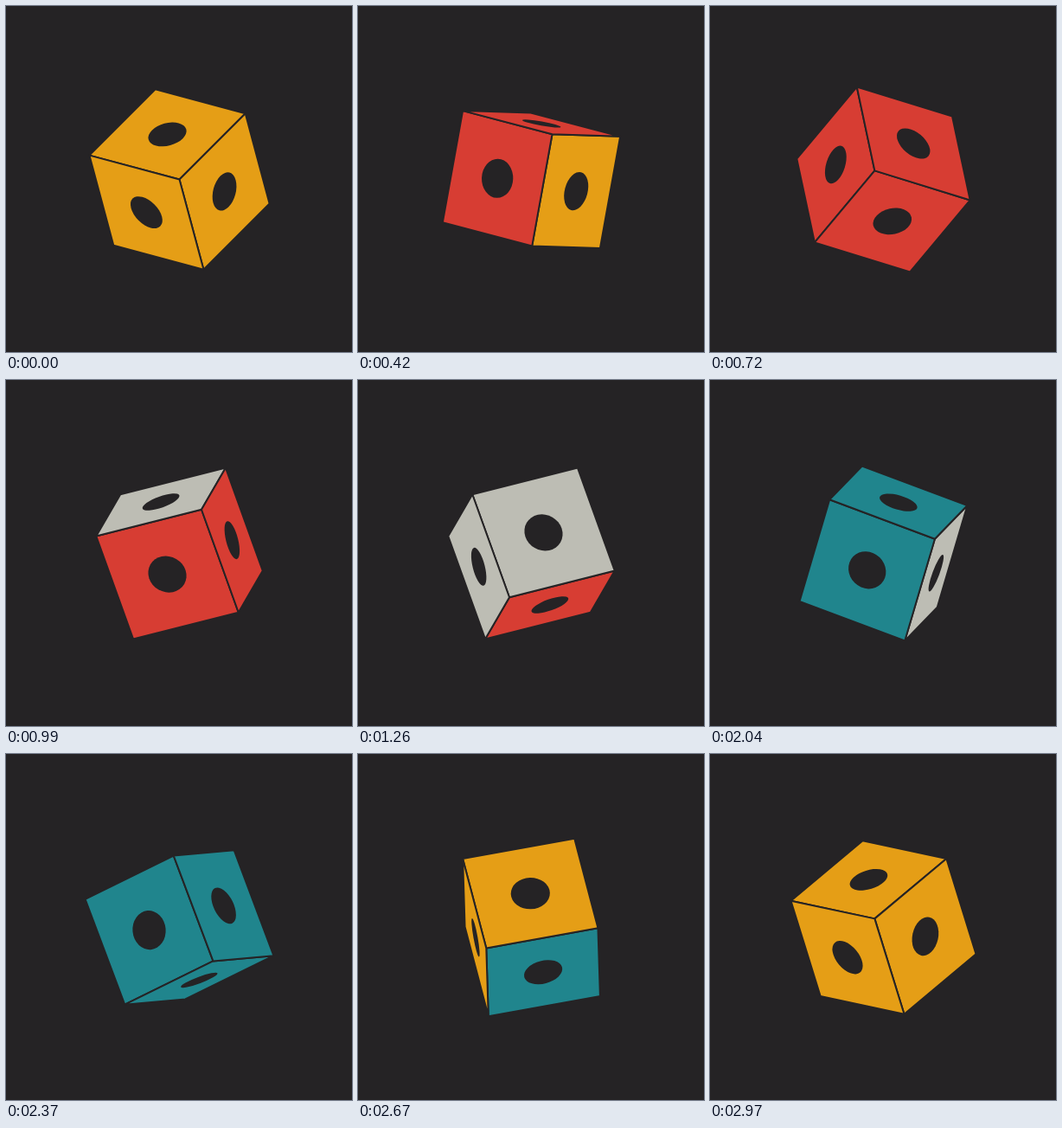
Animation, 400 px wide and 400 px high, one loop 3 s. Source, as an HTML page with a canvas:

```html
<!DOCTYPE html>
<html lang="en">
<head>
<meta charset="utf-8">
<title>Tumbling cube</title>
<style>
  html, body { margin: 0; width: 100%; height: 100%; overflow: hidden; background: #252325; }
  canvas { display: block; width: 400px; height: 400px; }
</style>
</head>
<body>
<canvas id="stage" width="400" height="400"></canvas>
<script>
const ctx = document.getElementById('stage').getContext('2d');
const LOOP = 3000, STEP = 30;
const BG = '#252325';
const CENTER = 200.5, SIDE = 132, HOLE = 22.6;
const COLORS = { front: ['#e59e16', '#bdbdb4'], back: ['#d73d33', '#20858d'] };

// Three cube axes, standing on a corner. u runs along the spin axis,
// phi is the angle around it and r the distance from it.
const tilt = Math.atan2(Math.sqrt(3 / 2), 1);
const far = Math.sqrt(5 / 6), near = Math.sqrt(1 / 3);
const AXES = [
  { u: Math.sqrt(1 / 6), r: far, phi: -tilt },
  { u: Math.sqrt(1 / 6), r: far, phi: tilt },
  { u: -Math.sqrt(2 / 3), r: near, phi: 0 }
];

// The spin axis lies in the screen, pointing up and to the right.
function project({ u, r, phi }, spin) {
  const v = r * Math.sin(phi + spin);
  return { x: (u + v) * Math.SQRT1_2, y: (v - u) * Math.SQRT1_2, z: r * Math.cos(phi + spin) };
}

// Each face takes its next colour while it is turned away.
function faceColor(turn, pair) {
  const k = Math.round(turn / (2 * Math.PI));
  return pair[Math.abs(k) % 2];
}

function drawFace(n, p, q, color) {
  const h = SIDE / 2;
  ctx.beginPath();
  for (const [i, j] of [[1, 1], [1, -1], [-1, -1], [-1, 1]]) {
    ctx.lineTo(h * (n.x + i * p.x + j * q.x), h * (n.y + i * p.y + j * q.y));
  }
  ctx.closePath();
  ctx.fillStyle = color;
  ctx.fill();
  ctx.stroke();

  ctx.beginPath();
  ctx.ellipse(h * n.x, h * n.y, HOLE * n.z, HOLE, Math.atan2(n.y, n.x), 0, 2 * Math.PI);
  ctx.fillStyle = BG;
  ctx.fill();
}

function draw(time) {
  const t = Math.floor((time % LOOP) / STEP) * STEP;
  const spin = t / LOOP * 4 * Math.PI;
  const dirs = AXES.map(a => project(a, spin));

  ctx.setTransform(1, 0, 0, 1, 0, 0);
  ctx.fillStyle = BG;
  ctx.fillRect(0, 0, 400, 400);
  ctx.translate(CENTER, CENTER);
  ctx.strokeStyle = BG;
  ctx.lineWidth = 2;
  ctx.lineJoin = 'round';

  dirs.forEach((d, i) => {
    const s = d.z > 0 ? 1 : -1;
    const n = { x: s * d.x, y: s * d.y, z: s * d.z };
    if (n.z < 1e-4) return;
    const turn = AXES[i].phi + spin;
    const color = s > 0 ? faceColor(turn, COLORS.front) : faceColor(turn - Math.PI, COLORS.back);
    drawFace(n, dirs[(i + 1) % 3], dirs[(i + 2) % 3], color);
  });
}

function tick() {
  draw(performance.now());
  requestAnimationFrame(tick);
}
tick();
</script>
</body>
</html>
```
